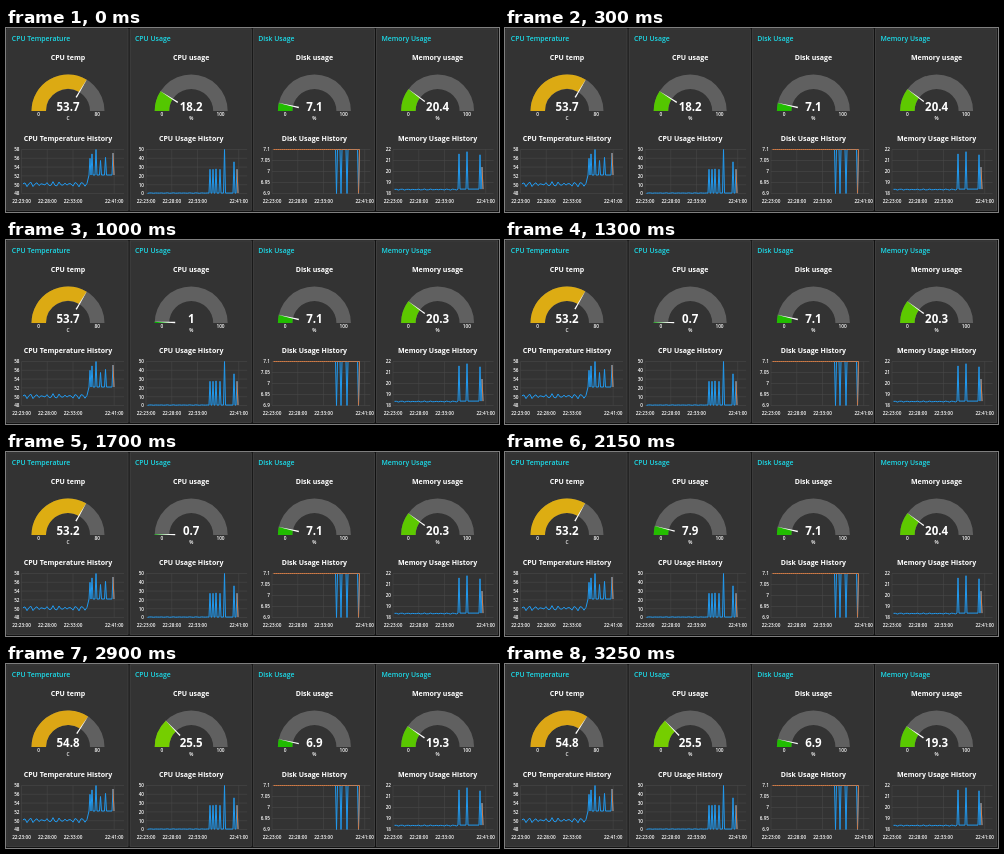
Animation of 493 by 184 pixels, one loop 3300 ms. Source, as an HTML page:

```html
<!DOCTYPE html>
<html lang="en">
<head>
<meta charset="utf-8">
<title>System dashboard</title>
<style>
html, body { margin: 0; width: 100%; height: 100%; overflow: hidden; background: #111; }
svg { display: block; }
text { font-family: "Open Sans", "Noto Sans", sans-serif; fill: #fff; text-anchor: middle; }
.title { font-size: 6.9px; font-weight: 600; fill: #1cdcea; text-anchor: start; }
.label { font-size: 7px; font-weight: 700; }
.value { font-size: 11.5px; font-weight: 700; }
.small { font-size: 4.8px; font-weight: 600; }
.tick { font-size: 4.7px; font-weight: 600; }
.y { text-anchor: end; }
.panel { fill: #333; stroke: #4a4a4a; stroke-width: .7; }
.grid { stroke: #4a4a4a; stroke-width: .5; }
polyline { fill: none; stroke-width: 1; stroke-linejoin: round; }
</style>
</head>
<body>
<svg id="stage" width="493" height="184" viewBox="0 0 493 184"></svg>
<script>
const LOOP = 3300, FIRST = 450, EVERY = 720, EASE = 300;
const BLUE = '#2199ee', ORANGE = '#d07a45';
const PITCH = 123.2, TOP = 121.5, HEIGHT = 44, CY = 83, OUTER = 36.5, INNER = 22;
const stage = document.getElementById('stage');

// Peaks are [x, height], with heights as a share of the chart
const panels = [
  { title: 'CPU Temperature', name: 'CPU temp', unit: 'C', max: 80, values: [53.7, 53.7, 53.2, 53.2, 54.8],
    left: 15.5, top: 58, step: 2, rows: 5, base: .21, wobble: .04, quiet: 82, busy: .42,
    peaks: [[84, .8], [86, .9], [90, 1], [94.5, .75], [99.5, .82], [107, .92]] },
  { title: 'CPU Usage', name: 'CPU usage', unit: '%', max: 100, values: [18.2, 1, .7, 7.9, 25.5],
    left: 140, top: 50, step: 10, rows: 5, base: .01, wobble: .004, quiet: 202, busy: .01,
    peaks: [[204, .55], [207, .55], [210, .56], [214, .55], [218.5, 1], [228, .72], [231, .55]] },
  { title: 'Disk Usage', name: 'Disk usage', unit: '%', max: 100, values: [7.1, 7.1, 7.1, 7.1, 6.9],
    left: 266, top: 7.1, step: .05, rows: 4, base: 1, wobble: 0, quiet: 355, busy: 1, color: ORANGE,
    peaks: [[330.5, 0], [335, 0], [341, 0], [352.5, 0]] },
  { title: 'Memory Usage', name: 'Memory usage', unit: '%', max: 100, values: [20.4, 20.3, 20.3, 20.4, 19.3],
    left: 387, top: 22, step: 1, rows: 4, base: .09, wobble: .008, quiet: 451, busy: .1,
    peaks: [[453, .9], [461, .95], [474, .88], [476, .6]] }
];

function add(tag, attrs, text) {
  const el = document.createElementNS('http://www.w3.org/2000/svg', tag);
  for (const k in attrs) el.setAttribute(k, attrs[k]);
  if (text !== undefined) el.textContent = text;
  return stage.appendChild(el);
}
const label = (cls, x, y, text) => add('text', { class: cls, x, y }, text);
const grid = (x1, y1, x2, y2) => add('line', { class: 'grid', x1, y1, x2, y2 });
const level = share => TOP + HEIGHT * (1 - share);
const line = (points, stroke) =>
  add('polyline', { points: points.map(([x, share]) => [x, level(share)]).join(' '), stroke });

function drawChart(p, x) {
  for (let i = 0; i <= p.rows; i++) {
    const y = TOP + HEIGHT * i / p.rows;
    grid(p.left, y, x + 118, y);
    label('tick y', p.left - 2, y + 1.8, +(p.top - i * p.step).toFixed(2));
  }
  for (const minute of [0, 5, 10, 18]) {
    const tx = p.left + minute * 5.15;
    grid(tx, TOP, tx, TOP + HEIGHT);
    label('tick', tx, 174.5, `22:${23 + minute}:00`);
  }
  const calm = [];
  for (let cx = p.left + 1.5; cx <= p.quiet; cx += 2)
    calm.push([cx, p.base + p.wobble * (Math.sin(cx * 1.1) + .5 * Math.sin(cx * 2.3))]);
  const spikes = p.peaks.flatMap(([px, h]) => [[px - 1, p.busy], [px, h], [px + 1, p.busy]]);
  const last = calm[calm.length - 1];
  line(last[0] < spikes[0][0] ? [last, ...spikes] : spikes, BLUE);
  line(spikes.slice(-2), ORANGE);
  line(calm, p.color || BLUE);
}

function polar(cx, r, part) {
  const a = Math.PI * (1 - part);
  return [cx + r * Math.cos(a), CY - r * Math.sin(a)];
}

function band(cx, part) {
  return `M${polar(cx, INNER, 0)}L${polar(cx, OUTER, 0)}A${OUTER} ${OUTER} 0 0 1 ${polar(cx, OUTER, part)}` +
    `L${polar(cx, INNER, part)}A${INNER} ${INNER} 0 0 0 ${polar(cx, INNER, 0)}Z`;
}

// Green through yellow to red
function heat(part) {
  const stops = [[0, 181, 0], [230, 230, 0], [202, 56, 56]];
  const i = part < .5 ? 0 : 1, k = part * 2 - i;
  return `rgb(${stops[i].map((c, j) => Math.round(c + (stops[i + 1][j] - c) * k))})`;
}

panels.forEach((p, i) => {
  const x = i * PITCH;
  p.cx = x + 62;
  add('rect', { class: 'panel', x: x + .8, y: .8, width: 121.3, height: 181.6 });
  label('title', x + 5.8, 12.6, p.title);
  label('label', p.cx, 32, p.name);
  label('label', p.cx, 113, p.title + ' History');
  add('path', { d: band(p.cx, 1), fill: '#606060' });
  p.fill = add('path', {});
  p.needle = add('path', { fill: '#fff' });
  p.value = label('value', p.cx, 82.5, '');
  label('small', p.cx, 91.5, p.unit);
  label('small', p.cx - 29.3, 88, 0);
  label('small', p.cx + 29.3, 88, p.max);
  drawChart(p, x);
});

function draw(now) {
  const t = now % LOOP - FIRST;
  const n = Math.max(0, Math.floor(t / EVERY) + 1);
  const k = 1 - (1 - Math.min(1, (t - (n - 1) * EVERY) / EASE)) ** 3;
  for (const p of panels) {
    const to = p.values[n], from = n ? p.values[n - 1] : to;
    const part = (from + (to - from) * k) / p.max;
    p.fill.setAttribute('d', band(p.cx, part));
    p.fill.setAttribute('fill', heat(part));
    p.needle.setAttribute('d', `M${polar(p.cx, 37.5, part)}L${polar(p.cx, 16, part - .014)}L${polar(p.cx, 16, part + .014)}Z`);
    p.value.textContent = to;
  }
  requestAnimationFrame(() => draw(performance.now()));
}
draw(0);
</script>
</body>
</html>
```
